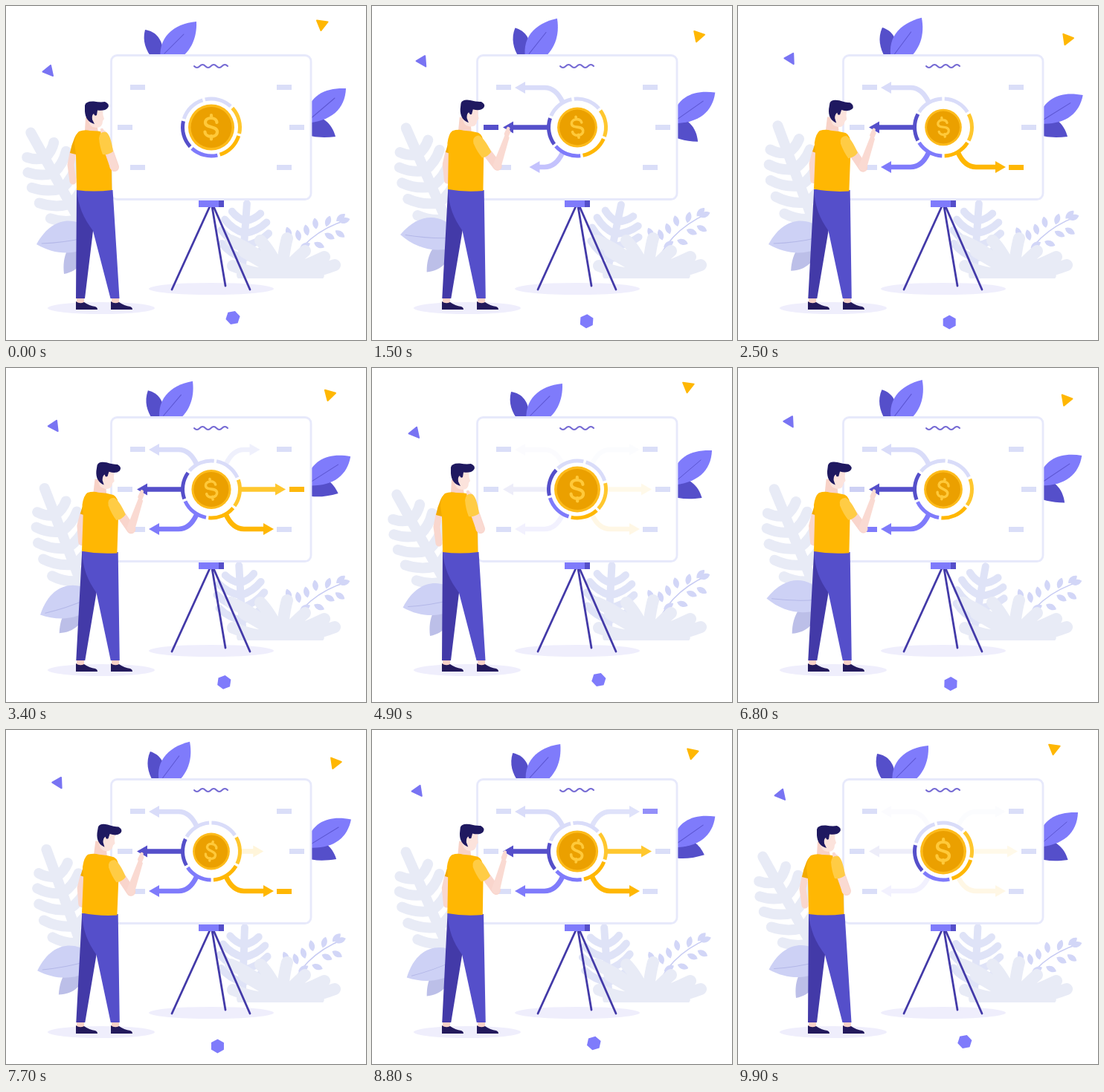
These frames come from a looping animation (484 px wide and 450 px high, 10000 ms). An HTML page:

```html
<!DOCTYPE html>
<html lang="en">
<head>
<meta charset="utf-8">
<title>Presentation</title>
<style>
@property --t { syntax: "<number>"; inherits: true; initial-value: 0; }
@property --u { syntax: "<number>"; inherits: true; initial-value: 0; }
@property --drift { syntax: "<number>"; inherits: true; initial-value: 0; }
@property --lean { syntax: "<number>"; inherits: true; initial-value: 0; }
@property --point { syntax: "<number>"; inherits: true; initial-value: 0; }

html, body { margin: 0; width: 100%; height: 100%; overflow: hidden; background: #fff; }
svg {
  display: block; width: 484px; height: 450px;
  --sway: sin(var(--u) * 72deg);
  animation: long 10s linear infinite, short 5s linear infinite,
    drift 5s linear infinite, lean 5s linear infinite, point 5s ease-in-out infinite;
}
@keyframes long { to { --t: 10; } }
@keyframes short { to { --u: 5; } }
@keyframes drift {
  0% { --drift: 0; } 8% { --drift: .05; } 18% { --drift: .28; } 30% { --drift: .78; }
  38% { --drift: .95; } 47% { --drift: 1; } 54% { --drift: .98; } 68% { --drift: .56; }
  80% { --drift: .2; } 92% { --drift: .03; } 100% { --drift: 0; }
}
@keyframes lean {
  0% { --lean: 0; } 8% { --lean: .1; } 18% { --lean: .33; } 30% { --lean: .6; }
  42% { --lean: .87; } 54% { --lean: 1; } 68% { --lean: .88; } 80% { --lean: .45; }
  90% { --lean: .1; } 97%, 100% { --lean: 0; }
}
@keyframes point {
  0% { --point: 0; } 17%, 71% { --point: 1; } 95%, 100% { --point: 0; }
}

.top-light { transform-origin: 215px 80px; transform: rotate(calc(var(--drift) * -8.5deg)); }
.top-dark { transform-origin: 210px 75px; transform: rotate(calc(var(--drift) * 9deg)); }
.side-light { transform-origin: 400px 160px; transform: rotate(calc(var(--lean) * 9deg)); }
.side-dark { transform-origin: 400px 150px; transform: rotate(calc(var(--sway) * 10deg)); }
.low-light { transform-origin: 104px 300px; transform: rotate(calc(var(--sway) * 12deg)); }
.low-dark { transform-origin: 100px 318px; transform: rotate(calc(var(--lean) * 10deg)); }
.fern-left { transform-origin: 105px 300px; transform: rotate(calc(var(--lean) * 9deg)); }
.fern-right { transform-origin: 318px 350px; transform: rotate(calc(var(--sway) * 8deg)); }
.branch { transform-origin: 385px 350px; transform: rotate(calc((cos(var(--t) * 108deg) - 1) * 3.5deg)); }

.tri-blue {
  transform-origin: 57px 88px;
  transform: translate(calc(var(--drift) * 13px), calc(var(--drift) * -17px)) rotate(calc(var(--drift) * 10deg));
}
.tri-gold {
  transform-origin: 425px 25px;
  transform: translate(calc(var(--drift) * 18px), calc(var(--drift) * 20px)) rotate(calc(var(--drift) * 14deg));
}
.hex {
  transform-origin: 305px 420px;
  transform: translate(calc(var(--drift) * -21px), calc(var(--drift) * 6px)) rotate(calc(var(--drift) * -18deg));
}

.ring { transform-origin: 276px 163.5px; transform: rotate(calc(cos(var(--t) * 36deg) * -15deg)); fill: none; stroke-width: 5; }
.coin { transform-origin: 276px 163.5px; transform: scale(calc(.9 + .1 * cos(var(--u) * 72deg))); }
.dollar { transform-origin: 276px 163px; transform: rotate(calc(sin(var(--t) * 36deg) * -10deg)); }

#arrows { opacity: clamp(0, (4.95 - var(--u)) / .5, 1); }
.arrow { --grow: clamp(0, (var(--u) - var(--at)) / .35, 1); opacity: var(--grow); }
.arrow path { fill: none; stroke-width: 6.6; stroke-dasharray: var(--len) 200px; stroke-dashoffset: calc((1 - var(--grow)) * 36px); }
.arrow polygon { stroke: none; transform: translateX(calc((1 - var(--grow)) * 36px)); }
.lit {
  opacity: min(clamp(0, (var(--u) - var(--at) - .25) / .2, 1), clamp(0, (var(--at) + 1.05 - var(--u)) / .3, 1));
}

.legs { transform-origin: 0 400px; transform: skewX(calc(var(--point) * -2.7deg)); }
.torso { transform-origin: 118px 247px; transform: translateX(calc(var(--point) * 7px)) rotate(calc(var(--lean) * 3.7deg)); }
.head { transform-origin: 116px 166px; transform: translateY(calc(var(--point) * -2px)) rotate(calc(var(--lean) * 6deg)); }
.back-arm { transform: translateX(calc(var(--point) * 4px)); }
.arm {
  transform-origin: 133px 179px;
  transform: translate(calc(var(--point) * 2px), calc(var(--point) * 4px)) rotate(calc(var(--point) * (var(--lean) * 6deg - 24deg)));
}
.forearm { transform-origin: 146px 217px; transform: rotate(calc(var(--point) * (59deg - var(--lean) * 10deg))); }
.round { fill: none; stroke-linecap: round; stroke-linejoin: round; }
</style>
</head>
<body>
<svg viewBox="0 0 484 450">
  <defs>
    <clipPath id="ground"><path d="M270 250H484V367H270z"/></clipPath>
  </defs>

  <!-- plants -->
  <g class="top-dark"><path d="M187 32C201 34 212 44 212 70L197 71C188 60 183 47 187 32z" fill="#554fca"/></g>
  <g class="top-light">
    <path d="M256 21C225 24 203 42 208 76L226 76C248 64 257 44 256 21z" fill="#7f7bfb"/>
    <path d="M213 64L239 38" class="round" stroke="#5c56d2"/>
  </g>
  <g class="side-dark"><path d="M398 146C424 145 438 157 443 176C425 178 411 177 398 171z" fill="#554fca"/></g>
  <g class="side-light">
    <path d="M457 111C430 110 408 119 402 150L401 158C438 156 456 138 457 111z" fill="#7f7bfb"/>
    <path d="M408 153L442 124" class="round" stroke="#5c56d2"/>
  </g>
  <g class="fern-left"><g id="fernL" class="round" stroke="#e8ebf6" transform="translate(105 300) rotate(-29)"/></g>
  <g class="low-dark"><path d="M104 310C84 318 75 336 78 361C98 357 108 343 110 320z" fill="#bcbfe8"/></g>
  <g class="low-light">
    <path d="M41 321C62 283 92 284 112 300L112 325C90 336 65 335 41 321z" fill="#cdd1f5"/>
    <path d="M48 320Q78 319 108 312" class="round" stroke="#b4b8e8"/>
  </g>
  <g class="fern-right"><g id="fernR" class="round" stroke="#dfe3f7" transform="translate(318 350) rotate(4)"/></g>
  <g class="branch"><g id="branch" fill="#d2d6f7"><path d="M376 358C394 322 420 300 459 288" class="round" stroke="#c6caf3" stroke-width="1.5"/></g></g>
  <g clip-path="url(#ground)"><g id="bush" class="round" stroke="#e8ebf6" stroke-width="16"/></g>

  <!-- floating shapes -->
  <path class="tri-blue" d="M60 80L49.500 88.500L63 94z" fill="#7974f3" stroke="#7974f3" stroke-width="2" stroke-linejoin="round"/>
  <path class="tri-gold" d="M418 19.500L432.500 21.500L423.500 33z" fill="#ffb703" stroke="#ffb703" stroke-width="2" stroke-linejoin="round"/>
  <g class="hex"><path d="M305 410.500L313.500 415.200V424.800L305 429.500L296.500 424.800V415.200z" transform="rotate(18 305 420)" fill="#7f7bfb"/></g>

  <!-- board and tripod -->
  <ellipse cx="276" cy="381" rx="84" ry="8" fill="#efeefc"/>
  <g class="round" stroke="#433aa8" stroke-width="2.800">
    <path d="M274 270L223 382M277 270L295 377M279 270L328 382"/>
  </g>
  <path d="M259 261H293V271H259z" fill="#7f7bfb"/>
  <path d="M286 261H293V271H286z" fill="#554fca"/>
  <rect x="141.500" y="66.500" width="268.500" height="194" rx="8" fill="#fff" stroke="#e7e9fb" stroke-width="2.800"/>
  <path d="M253 81q3.750 4 7.500 0t7.500 0t7.500 0t7.500 0t7.500 0t7.500 0" class="round" stroke="#7469d3" stroke-width="2"/>
  <g id="labels"></g>
  <g id="arrows"></g>
  <g class="ring" id="ring"></g>
  <g class="coin">
    <circle cx="276" cy="163.500" r="31" fill="#fdbb1b"/>
    <circle cx="276" cy="163.500" r="27.500" fill="#eba000"/>
    <path class="dollar round" stroke="#ffc93a" stroke-width="4.200" d="M283.500 157C283 149 268 149 268 157C268 165 284 161 284 169.500C284 178 268 178 267.500 169.500M276 147V151M276 175V179.500"/>
  </g>

  <!-- presenter -->
  <ellipse cx="128" cy="407" rx="72" ry="8" fill="#efeefc"/>
  <g id="feet"></g>
  <g class="legs">
    <path d="M95 247H125L117 303L106 394H94z" fill="#433aa8"/>
    <path d="M95 247L143.500 248L152.500 394H140.500L117 303C104 285 97 270 95 247z" fill="#554fca"/>
  </g>
  <g class="torso">
    <g class="back-arm">
      <path d="M90 198L87 214L90 236" class="round" stroke="#f9d7ce" stroke-width="9"/>
      <path d="M105 168Q96 168 92 178Q88 187 86 198L98 201z" fill="#f2ab00"/>
    </g>
    <path d="M107 150H121L124 171Q114 174 106 168z" fill="#f8d2c7"/>
    <g class="head">
      <path d="M110 138H130L130.500 147L132 152L130 155Q130 164 121 164Q112 164 110 152z" fill="#fce3dc"/>
      <path d="M106 134Q107 128 118 128.500Q127 130 133 129Q140 132 137 137Q133 142 123 140.500L122 147Q119 149 118 145Q115 147 116 153L119 159Q107 156 106 142z" fill="#1f1960"/>
    </g>
    <path d="M98 169Q106 166 113 168Q124 168 133 170Q140 173 141 186L142.500 248Q118 251 95 248L94 200L92 186Q93 173 98 169z" fill="#ffb703"/>
    <g class="arm">
      <path d="M134 183L146 217" class="round" stroke="#f9d5cc" stroke-width="12"/>
      <g class="forearm">
        <path d="M140 219Q146 225 151.500 218L137 176H130z" fill="#fadad2"/>
        <path d="M133.500 177L132 170M130.500 175L129 167" class="round" stroke="#fadad2" stroke-width="4.500"/>
      </g>
      <path d="M125 178Q126 168 135 170Q141 175 144 196Q138 201 130 200Q126 190 125 178z" fill="#ffcc45"/>
    </g>
  </g>
</svg>
<script>
const el = id => document.getElementById(id);
const add = (id, markup) => el(id).insertAdjacentHTML("beforeend", markup);
const DARK = "#554fca", BLUE = "#7f7bfb", PALE = "#d9dcf9", GOLD = "#ffb703";

// Each branch: label corner, reveal time, mirror flags
const branches = [
  { x: 167, y: 106, at: .2, color: PALE, lit: "#938ff9" },
  { x: 150, y: 160, at: .78, color: DARK, straight: true },
  { x: 167, y: 214, at: 1.34, color: BLUE, flipY: true },
  { x: 364, y: 214, at: 2, color: GOLD, flipX: true, flipY: true },
  { x: 381, y: 160, at: 2.64, color: "#ffc72e", lit: GOLD, flipX: true, straight: true },
  { x: 364, y: 106, at: 3.23, color: "#dfe2fa", lit: "#938ff9", flipX: true }
];
for (const b of branches) {
  const box = `x="${b.x}" y="${b.y}" width="20" height="7"`;
  add("labels", `<rect ${box} fill="#dadef8"/><rect ${box} class="lit" fill="${b.lit || b.color}" style="--at:${b.at}"/>`);
  const line = b.straight ? "M236 163.500H189" : "M256 129Q247 110 232 110H205";
  const head = b.straight ? "176,163.500 190,155.500 190,171.500" : "192,110 206,102 206,118";
  const flip = `matrix(${b.flipX ? -1 : 1} 0 0 ${b.flipY ? -1 : 1} ${b.flipX ? 552 : 0} ${b.flipY ? 327 : 0})`;
  add("arrows", `<g transform="${flip}"><g class="arrow" style="--at:${b.at};--len:${b.straight ? 47 : 60}px">
    <path d="${line}" stroke="${b.color}"/><polygon points="${head}" fill="${b.color}"/></g></g>`);
}

["#ffc72e", GOLD, BLUE, DARK, PALE, PALE].forEach((color, i) =>
  add("ring", `<circle cx="276" cy="163.500" r="38.500" pathLength="360" stroke="${color}"
    stroke-dasharray="55 305" transform="rotate(${i * 60 - 27.5} 276 163.500)"/>`));

function fern(id, height, reach, width, rows) {
  let d = `M0 0V${-height}`;
  for (let i = 0; i < rows; i++) {
    const k = (i + .6) / rows;
    const y = -height * k * .8;
    const w = reach * Math.sin(Math.PI * (.3 + .55 * k));
    for (const side of [-1, 1]) d += `M0 ${y}Q${side * w * .6} ${y - w * .15} ${side * w} ${y - w * .6}`;
  }
  el(id).setAttribute("stroke-width", width);
  add(id, `<path d="${d}"/>`);
}
fern("fernL", 148, 36, 14, 5);
fern("fernR", 84, 32, 10, 4);

const tips = [[302, 316], [305, 350], [320, 331], [342, 316], [378, 313], [402, 330], [428, 338], [442, 349]];
add("bush", `<path d="${tips.map(([x, y]) => `M370 362Q${(x + 370) / 2} ${y + 14} ${x} ${y}`).join("")}M318 362H420"/>`);

const leaves = [[380, 305, -20], [393, 309, -12], [416, 293, -8], [433, 290, 20], [450, 285, 50],
  [402, 323, 65], [421, 322, 115], [435, 310, 120], [449, 307, 125], [455, 289, 75], [404, 302, -12]];
for (const [x, y, turn] of leaves)
  add("branch", `<path d="M0 9C-7 3-5-5 0-9C5-5 7 3 0 9z" transform="translate(${x} ${y}) rotate(${turn}) scale(.85)"/>`);

for (const x of [0, 47])
  add("feet", `<g transform="translate(${x})"><path d="M95 390H105V402H95z" fill="#f8d2c7"/>
    <path d="M94 398Q99 402 105 399Q112 404 120 405Q123 406 123 409H94z" fill="#231a5c"/></g>`);
</script>
</body>
</html>
```
